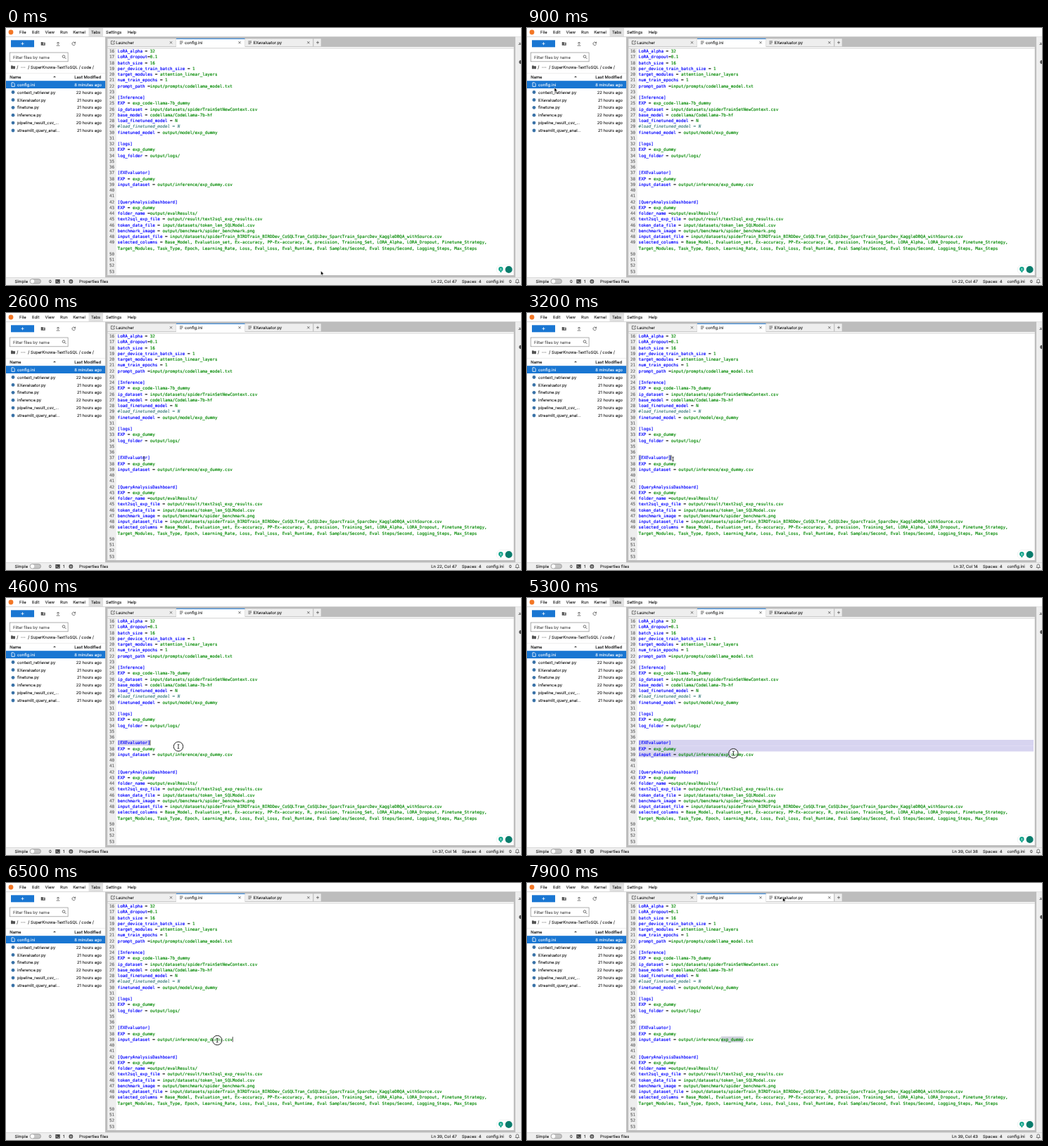
These frames come from a looping animation (732 px wide and 366 px high, 8000 ms). An HTML page:

```html
<!DOCTYPE html>
<html lang="en">
<head>
<meta charset="utf-8">
<title>Notebook editor</title>
<style>
html, body { margin: 0; width: 100%; height: 100%; overflow: hidden; background: #fff; }
svg { display: block; width: 732px; height: 366px; }
text { font: 5.8px Inter, sans-serif; color: #1c1c1c; white-space: pre; text-rendering: geometricPrecision; }
text, tspan { fill: currentColor; stroke: currentColor; stroke-width: .1; }
.code { font: 5.9px "DejaVu Sans Mono", monospace; }
.code, .code tspan { stroke-width: .16; }
.num { color: #666; text-anchor: end; }
.key { color: #00f; }
.value { color: #080; }
.comment { color: #408080; font-style: italic; }
.right { text-anchor: end; }
.white { color: #fff; }
.head { font-weight: 500; }
.hint { color: #555; }
.line { fill: none; stroke: #555; stroke-width: .8; }
</style>
</head>
<body>
<svg viewBox="0 0 732 366">
  <g id="frame"></g>
  <g id="selection"></g>
  <g id="code"></g>
  <g id="overlay"></g>
</svg>
<script>
const LOOP = 8000, LEFT = 158.6, CHAR = 3.552, PITCH = 8.25, FIRST = 16, FIRST_Y = 32.9;
const DOCK = "#bdbdbd", PANEL = "#eee";
const lines = `LoRA_alpha = 32
LoRA_dropout=0.1
batch_size = 16
per_device_train_batch_size = 1
target_modules = attention_linear_layers
num_train_epochs = 1
prompt_path =input/prompts/codellama_model.txt

[Inference]
EXP = exp_code-llama-7b_dummy
ip_dataset = input/datasets/spiderTrainSetNewContext.csv
base_model = codellama/CodeLlama-7b-hf
load_finetuned_model = N
#load_finetuned_model = N
finetuned_model = output/model/exp_dummy

[logs]
EXP = exp_dummy
log_folder = output/logs/


[EXEvaluator]
EXP = exp_dummy
input_dataset = output/inference/exp_dummy.csv


[QueryAnalysisDashboard]
EXP = exp_dummy
folder_name =output/evalResults/
text2sql_exp_file = output/result/text2sql_exp_results.csv
token_data_file = input/datasets/token_len_SQLModel.csv
benchmark_image = output/benchmark/spider_benchmark.png
input_dataset_file = input/datasets/spiderTrain_BIRDTrain_BIRDDev_CoSQLTran_CoSQLDev_SparcTrain_SparcDev_KaggleDBQA_withSource.csv
selected_columns = Base_Model, Evaluation_set, Ex-accuracy, PP-Ex-accuracy, R, precision, Training_Set, LORA_Alpha, LORA_Dropout, Finetune_Strategy,
~Target_Modules, Task_Type, Epoch, Learning_Rate, Loss, Eval_Loss, Eval_Runtime, Eval Samples/Second, Eval Steps/Second, Logging_Steps, Max_Steps



`.split("\n");

const layer = id => document.getElementById(id);
const rect = (x, y, w, h, fill, more = "") => `<rect x="${x}" y="${y}" width="${w}" height="${h}" fill="${fill}" ${more}/>`;
const circle = (x, y, r, fill, more = "") => `<circle cx="${x}" cy="${y}" r="${r}" fill="${fill}" ${more}/>`;
const path = (d, more = "") => `<path class="line" d="${d}" ${more}/>`;
const label = (x, y, s, cls = "") => `<text x="${x}" y="${y + 2.1}" class="${cls}">${s}</text>`;
const cross = (x, y) => path(`M${x - 1.6} ${y - 1.6}l3.2 3.2m0-3.2l-3.2 3.2`);
const plus = (x, y, r, color) => path(`M${x - r} ${y}h${2 * r}M${x} ${y - r}v${2 * r}`, `style="stroke:${color}"`);
const folder = (x, y) => `<path d="M${x - 3} ${y - 2.4}h2.3l.8.8h2.9v4h-6z" fill="#555"/>`;
const sheet = (x, y) => path(`M${x - 2.3} ${y - 1.8}h4.6m-4.6 1.8h4.6m-4.6 1.8h3.2`);
const bulb = (x, y) => circle(x, y - .8, 3.2, "#12a48b") + rect(x - 1.2, y + 2.2, 2.4, 1.7, "#12a48b") +
  path(`M${x} ${y + 1.5}v-3m-1.2 1.2l1.2-1.2 1.2 1.2`, 'style="stroke:#fff;stroke-width:.6"');

function menuBar() {
  const items = { File: 19, Edit: 37, View: 55.5, Run: 77, Kernel: 95.3, Tabs: 121, Settings: 142, Help: 172.7 };
  return rect(117.5, 0, 20.5, 12, "#e0e0e0") + circle(7, 6, 3.4, "#f37726") +
    Object.entries(items).map(([s, x]) => label(x, 6, s)).join("") + rect(0, 12, 732, .6, DOCK);
}

function sidebar() {
  const files = [["config.ini", "8 minutes"], ["context_retriever.py", "22 hours"], ["EXevaluator.py", "21 hours"],
    ["finetune.py", "21 hours"], ["inference.py", "22 hours"], ["pipeline_result_csv_...", "20 hours"], ["streamlit_query_anal...", "21 hours"]];
  const rows = files.map(([name, age], i) => {
    const y = 80.6 + i * 10.9, cls = i ? "" : "white";
    const icon = i ? circle(10, y, 2.4, "#3b73a8") : path(`M8 ${y - 2.8}h2.6l1.6 1.6v4h-4.2z`, 'style="stroke:#fff"');
    return icon + label(16, y, name, cls) + label(136, y, age + " ago", cls + " right");
  });
  return rect(7, 17.3, 33, 10, "#1976d2") + plus(23.5, 22.3, 2, "#fff") + folder(52.7, 22.3) +
    plus(53.5, 22.6, 1, "#fff") + path("M74 24v-4m-1.8 1.8l1.8-1.8 1.8 1.8M71.6 25h4.8") +
    path("M98 20.9a2.3 2.3 0 1 0 .5 1.8M98.6 19.6v1.9h-1.9") +
    rect(5.3, 35, 82.8, 12.8, "#fff", 'stroke="#8c8c8c" stroke-width=".7"') + label(10, 41.4, "Filter files by name", "hint") +
    circle(82, 40.6, 1.8, "none", 'stroke="#555" stroke-width=".8"') + path("M83.4 42l2 2") +
    folder(10, 55.8) + label(15.3, 55.6, "/") + [22, 24.3, 26.6].map(x => circle(x, 56, .6, "#444")).join("") +
    label(31.3, 55.6, "/ SuperKnowa-TextToSQL / code /") +
    rect(0, 64.2, 141, .5, "#ddd") + label(5.3, 69.5, "Name", "head") + label(97.3, 69.7, "Last Modified", "head") +
    '<path d="M67 70.2l2-2 2 2z" fill="#444"/>' + rect(0, 75.2, 141, 10.8, "#1976d2") + rows.join("");
}

function mainArea() {
  const tabEdge = `stroke="${DOCK}" stroke-width=".6"`;
  return rect(141, 12.6, 583, 342.6, DOCK) + rect(724, 12.6, 8, 342.6, PANEL) +
    rect(144, 15, 98, 11.5, PANEL, tabEdge) +
    `<rect id="hoverTab" x="339.5" y="15" width="97" height="11.5" fill="${PANEL}" ${tabEdge}/>` +
    rect(437, 15, 11, 11.5, PANEL, tabEdge) +
    rect(242, 15, 97.5, 12, "#fff") + rect(242, 14.8, 97.5, 1, "#1976d2") +
    path("M152 18.4h-2.6v4.6h4.6v-2.4M153 18.4h1.2v1.2m0-1.2l-2.6 2.6") + label(156.2, 20.7, "Launcher") + cross(234.5, 20.7) +
    sheet(249.2, 20.7) + label(254, 20.7, "config.ini") + cross(332, 20.7) +
    sheet(346.7, 20.7) + label(351.5, 20.7, "EXevaluator.py") + cross(429.8, 20.7) + plus(443, 20.7, 2, "#555") +
    rect(144.5, 27, 577.2, 325, "#fff") + rect(144.5, 29, 12.2, 323, PANEL) + rect(144.5, 28.5, 577.2, .7, DOCK) +
    path("M729 21l2.5 2.5m-.6-2.8v2.8h-2.6") + circle(732, 48.5, 2.8, "#555");
}

function statusBar() {
  return rect(0, 355, 732, 11, PANEL) + rect(0, 355, 732, .5, "#c4c4c4") + label(12.5, 360.7, "Simple") +
    rect(34, 357.5, 15.5, 6.4, "#c4c4c4", 'rx="3.2" stroke="#777" stroke-width=".5"') + circle(37.5, 360.7, 2.7, "#fff") +
    label(61, 360.7, "0") + rect(70.3, 358, 6.4, 5.8, "#444") + path("M71.5 359.5l1.3 1.3-1.3 1.3m2 .3h2", 'style="stroke:#fff;stroke-width:.6"') +
    label(81, 360.7, "1") + circle(92.3, 360.9, 2.2, "none", 'stroke="#444" stroke-width="1.4"') + circle(92.3, 360.9, .8, "#444") +
    label(104, 360.7, "Properties files") + label(648, 360.7, "Spaces: 4") + label(682.5, 360.7, "config.ini") + label(715, 360.7, "0") +
    path("M724 362.5h5.4l-.8-1v-1.7a1.9 1.9 0 0 0-3.8 0v1.7zM726 363.8h1.4") +
    `<text id="position" class="right" x="640.8" y="362.8"></text>`;
}

function codeLine(source, row) {
  const y = FIRST_Y + 2.2 + row * PITCH, wrapped = source[0] === "~", number = FIRST + row - (row > 33 ? 1 : 0);
  const span = (cls, s) => `<tspan class="${cls}">${s}</tspan>`;
  const [, key, sign, value] = source.match(/^([^=]*?)( ?= ?)(.*)$/) || [];
  const body = wrapped ? span("value", source.slice(1))
    : source[0] === "#" ? span("comment", source)
    : key ? span("key", key) + sign + span("value", value) : span("key", source);
  return (wrapped ? "" : `<text class="code num" x="154" y="${y}">${number}</text>`) +
    `<text class="code" x="${LEFT}" y="${y}">${body}</text>`;
}

// Pointer path: time, x, y
const track = [[0, 447.5, 346], [900, 39, 85], [1000, 38.5, 84.5], [1100, 38.5, 84.5], [1550, 242, 229], [1900, 163.7, 206],
  [2000, 163.7, 206], [2900, 207.5, 208], [3300, 207.5, 208], [3800, 190, 217], [4200, 162, 204], [4300, 162, 204],
  [4600, 245, 211.5], [4700, 247, 214], [4900, 247, 214], [5600, 323.5, 226], [6200, 323.5, 226], [6400, 300.3, 224],
  [7100, 300.3, 224], [7900, 363.5, 20.8]];

function pointerAt(t) {
  const i = track.findIndex(k => k[0] > t);
  if (i < 0) return track.at(-1).slice(1);
  const [t0, x0, y0] = track[i - 1], [t1, x1, y1] = track[i];
  const p = (t - t0) / (t1 - t0), e = p * p * (3 - 2 * p);
  return [x0 + (x1 - x0) * e, y0 + (y1 - y0) * e];
}

const rowTop = line => FIRST_Y + (line - FIRST - .5) * PITCH;
const columnX = col => LEFT + col * CHAR;
const mark = (line, from, to, fill) => rect(columnX(from), rowTop(line), to === Infinity ? 720 - columnX(from) : (to - from) * CHAR, PITCH, fill);
const caret = (line, col) => rect(columnX(col) - .2, rowTop(line) + .4, .7, PITCH - .8, "#000");
const within = (t, a, b) => t >= a && t < b;

function headAt(x, y) {
  const line = 37 + Math.max(0, Math.min(2, Math.floor((y - 1.5 - rowTop(37)) / PITCH)));
  const col = Math.max(0, Math.min(lines[line - FIRST].length, Math.floor((x - LEFT) / CHAR)));
  return [line, col];
}

function pointer(t, x, y) {
  const pressed = within(t, 3000, 3100) || within(t, 4300, 6100) || within(t, 6400, 6800);
  const ring = pressed ? circle(x, y, 6.7, "#fff", 'fill-opacity=".45" stroke="#222" stroke-width="1"') : "";
  const beam = `M${x - 1.3} ${y - 3}q1.3 0 1.3 1v4q0 1-1.3 1m2.6-6q-1.3 0-1.3 1m0 4q0 1 1.3 1`;
  const arrow = `<path d="M0 0v6l1.4-1.3 1 2 .9-.4-.9-2h1.9z" transform="translate(${x} ${y})" fill="#000" stroke="#fff" stroke-width=".5"/>`;
  return ring + (within(t, 2100, 7900) && y > 28 ? path(beam, 'style="stroke:#111"') : arrow);
}

function draw(t) {
  const [x, y] = pointerAt(t);
  const popup = within(t, 5800, 6100);
  let head = [22, 46], marks = "", top = "";
  if (within(t, 3100, 4300)) {
    head = [37, 13];
    marks = mark(37, 0, 1, "#bcc4cc") + mark(37, 12, 13, "#bcc4cc");
    top = caret(...head);
  } else if (within(t, 4300, 6100)) {
    head = headAt(x, y);
    for (let line = 37; line <= head[0]; line++)
      marks += mark(line, 0, line < head[0] ? Infinity : head[1], "#d7d4f0");
    if (head[0] === 37) top = caret(...head);
  } else if (within(t, 6100, 6600)) {
    head = [39, 46];
    top = caret(...head);
  } else if (t >= 6600) {
    head = [39, 42];
    marks = mark(39, 33, 42, "#cfd0dc");
  }
  if (popup) top += rect(159.5, 228.3, 29.5, 13.4, "#fff", 'rx="6.5" stroke="#ddd" stroke-width=".6"') + bulb(181.7, 235) +
    path("M163.8 237.6l4.2-4.6 1.6 1.5-4.4 4.3zM164 231.6v2.4m-1.2-1.2h2.4", 'style="stroke:#12a48b;stroke-width:1.2"');
  else top += rect(697, 337.5, 24, 13, "#fff", 'rx="6.5" stroke="#e4e4e4" stroke-width=".5"') + bulb(703.3, 344);
  top += circle(714.6, 344, 5, "#087c6c");
  layer("selection").innerHTML = marks;
  layer("overlay").innerHTML = top + pointer(t, x, y);
  layer("position").textContent = `Ln ${head[0]}, Col ${head[1] + 1}`;
  layer("hoverTab").setAttribute("fill", y < 27 && x > 339 ? "#fff" : PANEL);
}

layer("frame").innerHTML = menuBar() + sidebar() + mainArea() + statusBar();
layer("code").innerHTML = lines.map(codeLine).join("");

const start = performance.now();
function tick() {
  const t = (performance.now() - start) % LOOP;
  draw(Math.floor(t / 100) * 100);
  requestAnimationFrame(tick);
}
tick();
</script>
</body>
</html>
```
